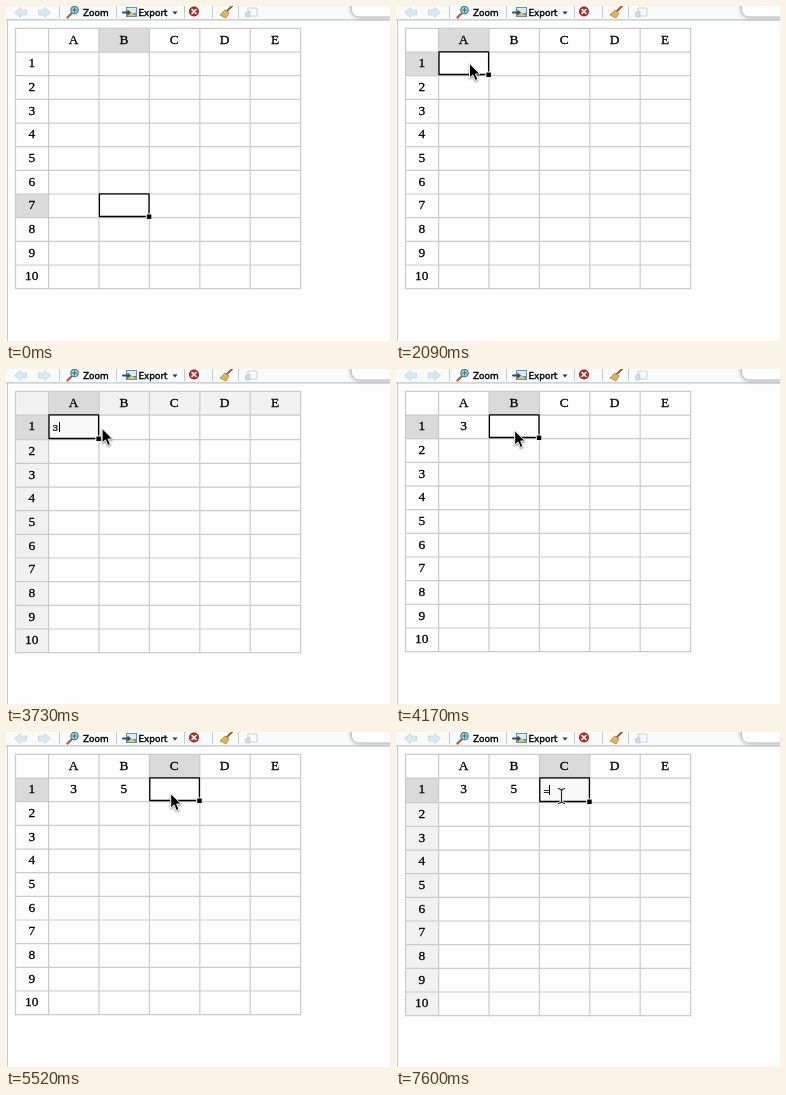
These frames come from a looping animation (384 px wide and 335 px high, 8 s). An HTML page with a canvas:

```html
<!DOCTYPE html>
<html lang="en">
<head>
<meta charset="utf-8">
<title>Spreadsheet demo</title>
<style>
  html, body { margin: 0; width: 100%; height: 100%; overflow: hidden; background: #fdfdfd; }
  canvas { display: block; }
</style>
</head>
<body>
<canvas id="stage" width="384" height="335"></canvas>
<script>
const ctx = document.getElementById('stage').getContext('2d');
const LOOP = 8000, TICK = 150;
const LEFT = 9.5, TOP = 22.4, COLUMN = 50.4, ROW = 23.66, HEADER = 33.1;
const GRID = '#cbcbcb', ACTIVE = '#dadada', PAPER = '#fdfdfd';
const SERIF = '13.4px "Liberation Serif", "Times New Roman", serif';

// Cells are selected one after another in row 1, then typed into.
const visits = [
  { select: 1940, edit: 2990, typed: '3' },
  { select: 4020, edit: 4770, typed: '5' },
  { select: 5520, edit: 7020, typed: '=' }
];
const entry = { x: 86, y: 278, start: 890 };
const glides = [
  { start: 890, end: 1340, x: 71, y: 62 },
  { start: 1490, end: 1790, x: 73.5, y: 57.5 },
  { start: 3290, end: 3890, x: 118.7, y: 61.5 },
  { start: 4920, end: 5370, x: 164.7, y: 61.5 }
];
const BEAM_START = 7450;

const columnX = column => column ? LEFT + HEADER + (column - 1) * COLUMN : LEFT;
const smooth = p => p * p * (3 - 2 * p);

function rect(color, x, y, w, h) {
  ctx.fillStyle = color;
  ctx.fillRect(x, y, w, h);
}

function shape(points, fill, stroke, width = 1) {
  ctx.beginPath();
  points.forEach(([x, y]) => ctx.lineTo(x, y));
  ctx.closePath();
  if (fill) { ctx.fillStyle = fill; ctx.fill(); }
  if (stroke) { ctx.strokeStyle = stroke; ctx.lineWidth = width; ctx.stroke(); }
}

function line(color, width, x1, y1, x2, y2) {
  shape([[x1, y1], [x2, y2]], null, color, width);
}

function cross(color, width, x, y, r, slant) {
  line(color, width, x - r, y - slant, x + r, y + slant);
  line(color, width, x + slant, y - r, x - slant, y + r);
}

function disc(x, y, r, fill, stroke) {
  ctx.beginPath();
  ctx.arc(x, y, r, 0, Math.PI * 2);
  ctx.fillStyle = fill;
  ctx.fill();
  ctx.strokeStyle = stroke;
  ctx.lineWidth = 1.2;
  ctx.stroke();
}

function text(value, x, y, font, align = 'left', weight = 0.3) {
  ctx.font = font;
  ctx.textAlign = align;
  ctx.fillStyle = ctx.strokeStyle = '#000';
  ctx.lineWidth = weight;
  ctx.fillText(value, x, y);
  ctx.strokeText(value, x, y);
}

const toolbarLabel = (value, x) => text(value, x, 9.5, '8.9px "DejaVu Sans", sans-serif', 'left', 0.4);

function toolbarArrow(x, direction) {
  const half = [[-6, 0], [0, -5], [0, -2.5], [6, -2.5]];
  const mirrored = half.map(([px, py]) => [px, -py]).reverse();
  shape([...half, ...mirrored].map(([px, py]) => [x + px * direction, 6.5 + py]), '#d6e8f0', '#c0d9e5', 0.8);
}

function drawToolbar() {
  rect('#f9fafa', 0, 0, 384, 13);
  rect('#b0b7bc', 0, 13.4, 384, 1);
  toolbarArrow(14.5, 1);
  toolbarArrow(38.5, -1);
  [53, 110, 178, 206, 232].forEach(x => rect('#c5cacd', x, 0, 1, 12));

  line('#b0603f', 2.4, 61.5, 11.5, 65.5, 7.5);
  disc(68.5, 4, 3.7, '#a9dce2', '#45808f');
  cross('#287b8c', 1.2, 68.5, 4, 2, 0);
  toolbarLabel('Zoom', 77);

  rect('#5b91bd', 120, 1, 11, 10);
  rect('#d7edf7', 121, 2, 9, 5);
  shape([[121, 10], [125, 6], [130, 10]], '#e8c355');
  line('#344f68', 2, 117, 6.5, 122, 6.5);
  shape([[121.5, 3.5], [125, 6.5], [121.5, 9.5]], '#344f68');
  toolbarLabel('Export', 132.5);
  shape([[166.5, 5.5], [171.5, 5.5], [169, 8.5]], '#333');

  disc(188, 5.5, 4.4, '#c5312d', '#98221f');
  cross('#fff', 1.5, 188, 5.5, 2, 2);

  line('#9b5a32', 2, 226, 0, 221, 5);
  shape([[219, 4], [223, 7], [220, 12], [214, 9]], '#e2b64f', '#b98532', 0.8);

  shape([[242, 2], [251, 2], [251, 10], [242, 10]], '#f8fbfc', '#c5d3db');
  shape([[239, 7], [244, 5], [244, 11], [240, 11]], '#c9dce7', '#b5cbd8', 0.7);

  ctx.save();
  ctx.shadowColor = '#0008';
  ctx.shadowBlur = 5;
  ctx.fillStyle = PAPER;
  ctx.beginPath();
  ctx.roundRect(346, -20, 60, 30.5, 7);
  ctx.fill();
  ctx.restore();
}

function drawSheet(t) {
  const visited = visits.filter(v => t >= v.select);
  const column = visited.length || 2;
  const row = visited.length ? 1 : 7;
  const current = visited.at(-1);
  const editing = current && t >= current.edit;
  // An open editor stretches row 1 by a pixel.
  const rowY = r => TOP + r * ROW + (editing && r > 1 ? 1 : 0);
  const right = columnX(6), bottom = rowY(11);
  const x = columnX(column), y = rowY(row);
  const h = rowY(row + 1) - y;

  if (editing) {
    rect('#f1f1f1', LEFT, rowY(2), HEADER, bottom - rowY(2));
    if (column === 1) rect('#f1f1f1', LEFT, TOP, right - LEFT, ROW);
  }
  rect(ACTIVE, x, TOP, COLUMN, ROW);
  rect(ACTIVE, LEFT, y, HEADER, h);

  for (let c = 0; c <= 6; c++) line(GRID, 1.2, columnX(c), TOP, columnX(c), bottom);
  for (let r = 0; r <= 11; r++) line(GRID, 1.2, LEFT, rowY(r), right, rowY(r));

  const label = (value, c, r) =>
    text(value, columnX(c) + (c ? COLUMN : HEADER) / 2 - 0.3, rowY(r) + 15.2, SERIF, 'center');
  [...'ABCDE'].forEach((name, i) => label(name, i + 1, 0));
  for (let r = 1; r <= 10; r++) label(r, 0, r);
  visited.slice(0, -1).forEach((v, i) => label(v.typed, i + 1, 1));

  if (editing) {
    rect('#f8f8f8', x + 1, y + 1, COLUMN - 2, h - 2);
    text(current.typed, x + 4, y + 15.8, '9.8px "Liberation Sans", Arial, sans-serif', 'left', 0.2);
    rect('#000', Math.round(x + 10), Math.round(y + 7), 1, 10);
  }
  ctx.strokeStyle = '#000';
  ctx.lineWidth = 1.3;
  ctx.strokeRect(x + 0.4, y - 0.2, COLUMN - 0.8, h - 1);
  const cornerX = x + COLUMN - 0.6, cornerY = y + h - 1.2;
  rect(PAPER, cornerX - 3, cornerY - 3, 6, 6);
  rect('#000', cornerX - 2, cornerY - 2, 4.5, 4.5);
}

// The pointer is sampled once per tick while it glides.
function pointerAt(t) {
  let { x, y } = entry;
  for (const glide of glides) {
    const elapsed = Math.floor((t - glide.start) / TICK) * TICK;
    const p = smooth(Math.min(1, Math.max(0, elapsed / (glide.end - glide.start))));
    x += (glide.x - x) * p;
    y += (glide.y - y) * p;
  }
  return [x, y];
}

function drawBeam(x, y) {
  for (const [color, width] of [['#fff', 3], ['#222', 1.2]]) {
    line(color, width, x, y - 6, x, y + 6);
    for (const side of [-1, 1]) {
      line(color, width, x, y - 6, x + 3 * side, y - 7.5);
      line(color, width, x, y + 6, x + 3 * side, y + 7.5);
    }
  }
}

function drawPointer(t) {
  if (t < entry.start) return;
  const [x, y] = pointerAt(t);
  if (t >= BEAM_START) return drawBeam(x + 0.8, y + 2.5);
  const arrow = [[0, 0], [0, 14.5], [3.4, 11.4], [5.7, 17], [8.3, 15.9], [6, 10.5], [10.5, 10.5]];
  ctx.save();
  ctx.shadowColor = '#0006';
  ctx.shadowBlur = 2;
  ctx.shadowOffsetY = 1;
  shape(arrow.map(([px, py]) => [x + px, y + py]), '#000', '#fff');
  ctx.restore();
}

function draw(t) {
  rect(PAPER, 0, 0, 384, 335);
  rect('#c8c8c8', 1, 14, 1, 321);
  drawToolbar();
  drawSheet(t);
  drawPointer(t);
}

ctx.lineJoin = 'round';
const start = performance.now();
function tick() {
  draw((performance.now() - start) % LOOP);
  requestAnimationFrame(tick);
}
tick();
</script>
</body>
</html>
```
